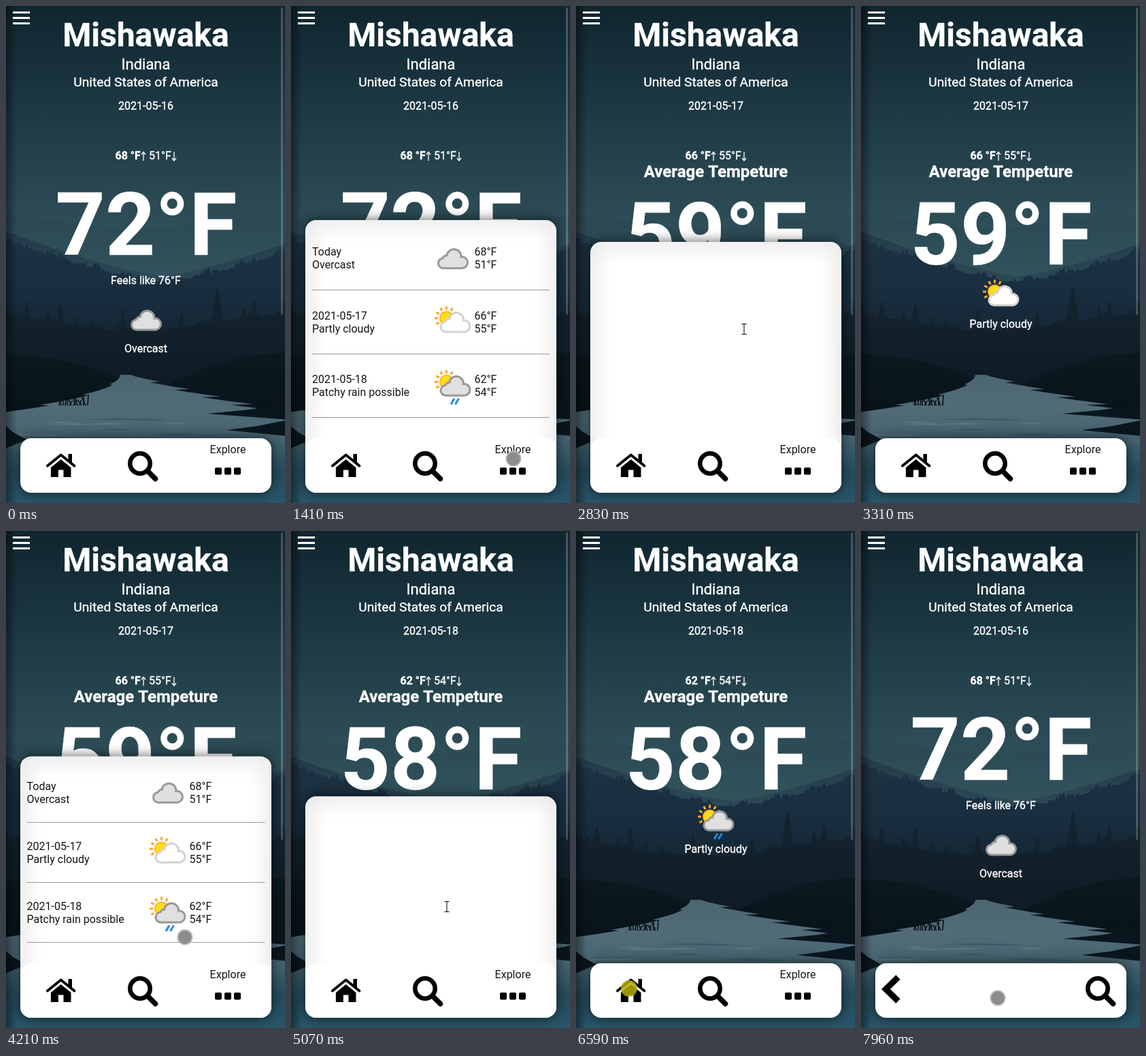
Recreate the animation shown at these times as an HTML page with a canvas. Size 410 by 729 pixels, loop 8000 ms.

```html
<!DOCTYPE html>
<html lang="en">
<head>
<meta charset="utf-8">
<title>Weather</title>
<style>
html, body { margin: 0; width: 100%; height: 100%; overflow: hidden; background: #10242f; }
canvas { display: block; width: 410px; height: 729px; }
</style>
</head>
<body>
<canvas id="stage" width="410" height="729"></canvas>
<script>
const W = 410, H = 729, LOOP = 8000, INK = '#151515';
const screenCtx = document.getElementById('stage').getContext('2d');
let c = screenCtx;

const days = [
  { date: '2021-05-16', name: 'Today', label: 'Overcast', hi: 68, lo: 51, main: '72°F', icon: 'cloud' },
  { date: '2021-05-17', name: '2021-05-17', label: 'Partly cloudy', hi: 66, lo: 55, main: '59°F', icon: 'sun' },
  { date: '2021-05-18', name: '2021-05-18', label: 'Patchy rain possible', hi: 62, lo: 54, main: '58°F', icon: 'rain' }
];

const clicks = [880, 2530, 3840, 4800, 6500, 7380];
const toggles = [1080, 2800, 3996, 5019]; // panel opens, closes, opens, closes
const HOME = 6710, SEARCH = 7450;

// stops of the pointer: arrival, departure, x, y
const stops = [
  [450, 450, 356, 700], [730, 1300, 348, 688], [1690, 1690, 274, 604], [2380, 2900, 247, 474],
  [3350, 4060, 346, 688], [4210, 4210, 263, 596], [4500, 5120, 229, 551],
  [5550, 5650, 215, 654], [6050, 6050, 150, 684], [6560, 6750, 78, 671], [7250, LOOP, 201, 685]
];

const within = (t, from, span) => t >= from && t < from + span;

// CSS "ease" curve
function ease(p) {
  if (p <= 0) return 0;
  if (p >= 1) return 1;
  let lo = 0, hi = 1, s = 0.5;
  for (let i = 0; i < 20; i++) {
    s = (lo + hi) / 2;
    if (0.75 * s * (1 - s) + s ** 3 < p) lo = s; else hi = s;
  }
  return 0.3 * s * (1 - s) ** 2 + 3 * s * s * (1 - s) + s ** 3;
}

const panelHeight = t =>
  toggles.reduce((h, start, i) => h + (i % 2 ? -320 : 320) * ease((t - start) / 300), 80);

function poly(points, fill) {
  c.beginPath();
  points.forEach(([x, y]) => c.lineTo(x, y));
  c.closePath();
  c.fillStyle = fill;
  c.fill();
}

function line(points, width, color, cap = 'butt') {
  c.beginPath();
  points.forEach(([x, y]) => c.lineTo(x, y));
  c.lineWidth = width;
  c.lineCap = cap;
  c.lineJoin = cap === 'round' ? 'round' : 'miter';
  c.strokeStyle = color;
  c.stroke();
}

function disc(x, y, r, fill) {
  c.beginPath();
  c.arc(x, y, r, 0, Math.PI * 2);
  c.fillStyle = fill;
  c.fill();
}

function box(x, y, w, h, r, fill) {
  c.beginPath();
  c.roundRect(x, y, w, h, r);
  c.fillStyle = fill;
  c.fill();
}

function text(str, x, y, { size = 16, color = '#fff', align = 'center', weight = 400 } = {}) {
  c.font = `${weight} ${size}px Roboto, sans-serif`;
  c.textAlign = align;
  c.fillStyle = color;
  c.fillText(str, x, y);
  if (color === INK) return;
  c.lineWidth = 0.35;
  c.strokeStyle = color;
  c.strokeText(str, x, y);
}

function vertical(y0, y1, ...colors) {
  const g = c.createLinearGradient(0, y0, 0, y1);
  colors.forEach((col, i) => g.addColorStop(i / (colors.length - 1), col));
  return g;
}

// ---- landscape ----
let seed = 7;
const rand = () => (seed = (seed * 16807) % 2147483647) / 2147483647;

const valley = (base, depth, power) => x => base - depth * Math.abs((x - 230) / 210) ** power;
const hills = x => 318 + 9 * Math.sin(x / 62 - 1.6);
const woods = x => 466 + 12 * Math.cos((x - 190) / 70);
const leftBank = x => x < 172 ? 512 + 36 * (x / 170) ** 2 : H;
const rightBank = x => x > 236 ? 510 + 43 * ((W - x) / 164) ** 2 : H;

function ridge(height, rough, fill) {
  const out = [[0, H]];
  for (let x = 0; x <= W; x += 2) {
    const clump = 0.6 + 0.4 * Math.sin(x / 9);
    out.push([x, height(x) - rand() * rough * clump]);
  }
  poly([...out, [W, H]], fill);
}

function pine(x, h, fill) {
  const base = woods(x) + 8, right = [], left = [];
  for (let i = 1; i <= 8; i++) {
    const y = base - h + h * i / 8, w = 1 + h * 0.2 * i / 8;
    right.push([x + w, y], [x + w / 2, y - 1]);
    left.unshift([x - w / 2, y - 1], [x - w, y]);
  }
  poly([[x, base - h], ...right, ...left], fill);
}

// stepped shores that widen towards the viewer
function river() {
  const left = [], right = [];
  for (let y = 541; y <= 598; y++) {
    const s = (y - 541) / 57;
    left.unshift([168 - 168 * s * s - 24 * s * ((y - 541) % 15 / 15), y]);
    right.push([184 + 200 * s ** 1.2 + 46 * Math.sqrt(s) * ((y - 541) % 11 / 11), y]);
  }
  poly([...right, [W, 598], [W, H], [0, H], ...left],
    vertical(540, H, '#4c6671', '#526c77', '#456370', '#264c5d', '#28566a'));
}

function islet(tip, y, end, h) {
  const mid = (tip + end) / 2;
  poly([[tip, y], [mid, y - h * 0.4], [end, y - h], [end, y + h * 0.6], [mid, y + h * 0.3]], '#0a161e');
}

function landscape() {
  c.fillStyle = vertical(0, 400, '#10262f', '#18323d', '#223f49', '#2c4b55', '#335660');
  c.fillRect(0, 0, W, H);
  ridge(hills, 0, vertical(305, 410, '#2a4852', '#33555f'));
  ridge(valley(396, 58, 1.3), 0, vertical(335, 410, '#233c4a', '#2d4a57'));
  ridge(valley(406, 54, 1.4), 13, vertical(350, 500, '#1c3141', '#182d3e', '#142534'));
  const dark = '#13222d';
  [[80, 38], [172, 42], [311, 60], [365, 34]].forEach(([x, h]) => pine(x, h, dark));
  for (let i = 0; i < 14; i++) pine(i * 30 + rand() * 20, 18 + rand() * 18, dark);
  ridge(woods, 10, vertical(450, 560, dark, '#0e1b25'));
  const bank = vertical(510, 600, '#0b191f', '#08131a');
  ridge(leftBank, 2, bank);
  ridge(rightBank, 2, bank);
  river();
  for (let x = 78; x < 122; x += 3) {
    line([[x, 586], [x + rand() * 12 - 6, 570 + rand() * 9]], 1.6, '#09141b');
  }
  for (let i = 0; i < 10; i++) {
    const x = rand() * 300, y = 600 + rand() * 30, w = 40 + rand() * 80;
    poly([[x, y], [x + w / 2, y - 1.5], [x + w, y], [x + w / 2, y + 1.5]], i % 2 ? '#3a5a69' : '#5a7680');
  }
  islet(296, 598, W, 14);
  islet(324, 622, W, 14);
  islet(30, 636, -10, 28);

  const edge = c.createLinearGradient(0, 0, 16, 0);
  edge.addColorStop(0, 'rgba(0,0,0,.42)');
  edge.addColorStop(1, 'rgba(0,0,0,0)');
  c.fillStyle = edge;
  c.fillRect(0, 0, 16, H);
}

const scene = document.createElement('canvas');
scene.width = W;
scene.height = H;
c = scene.getContext('2d');
landscape();
c = screenCtx;

// ---- weather icons ----
function cloud(x, y, edge, fill) {
  const puffs = [[-14, 6.5, 9], [-9, 1, 7.5], [1.5, -3.5, 12], [13, 5.5, 10]];
  [[0, edge], [3, fill]].forEach(([inset, col]) => {
    puffs.forEach(([dx, dy, r]) => disc(x + dx, y + dy, r - inset, col));
    c.fillRect(x - 14, y, 27, 15.5 - inset);
  });
}

function icon(kind, x, y) {
  if (kind === 'cloud') return cloud(x, y, '#999', '#e0e0e0');
  const sx = x - 9.5, sy = y - 6;
  for (let a = 0; a < 6.2; a += Math.PI / 6) {
    const dx = Math.cos(a), dy = Math.sin(a);
    line([[sx + dx * 12.5, sy + dy * 12.5], [sx + dx * 17.5, sy + dy * 17.5]], 3, '#f9a825');
  }
  disc(sx, sy, 10.5, '#f9a825');
  disc(sx, sy, 9, '#ffdd15');
  if (kind === 'sun') return cloud(x + 3.5, y, '#d2d2d2', '#fff');
  cloud(x + 3.5, y, '#999', '#e0e0e0');
  [-3, 3.5].forEach(dx => line([[x + dx, y + 27], [x + dx + 5, y + 18.5]], 3, '#2a86dd'));
}

// ---- page parts ----
function arrow(x, dir) {
  const tip = 220.5 - dir * 6.5;
  line([[x, 220.5 + dir * 6.5], [x, tip + dir]], 1.3, '#fff');
  line([[x - 3, tip + dir * 4], [x, tip], [x + 3, tip + dir * 4]], 1.3, '#fff');
}

function header(day) {
  const mid = 205.5, today = day === days[0];
  [8, 16, 24].forEach(y => box(10, y, 25, 3, 0, '#fff'));
  text('Mishawaka', mid, 59, { size: 48, weight: 700 });
  text('Indiana', mid, 93, { size: 22 });
  text('United States of America', mid, 118, { size: 19.2 });
  text(day.date, mid, 152);
  text(day.hi + ' °F', 160.5, 225, { align: 'left', weight: 700 });
  arrow(202, 1);
  text(day.lo + '°F', 210, 225, { align: 'left' });
  arrow(247, -1);
  text(day.main, 206, today ? 365 : 379, { size: 128, weight: 700 });
  if (today) {
    text('Feels like 76°F', mid, 408);
  } else {
    text('Average Tempeture', mid, 251, { size: 24, weight: 700 });
  }
  icon(day.icon, 206, today ? 461 : 425);
  text(today ? 'Overcast' : 'Partly cloudy', mid, today ? 508 : 472);
}

function list(h) {
  const inset = h / 40, top = 714 - h + inset, pitch = Math.max(44, (604 - top) / 3);
  if (top >= 604) return;
  const x = 21 + inset, style = { color: INK, align: 'left' };
  c.save();
  c.beginPath();
  c.rect(21, top, 369, 604 - top);
  c.clip();
  days.forEach((d, i) => {
    const y = top + pitch * (i + 0.5);
    text(d.name, x, y - 4.5, style);
    text(d.label, x, y + 14.5, style);
    icon(d.icon, 238, y);
    text(d.hi + '°F', 269.5, y - 4.5, style);
    text(d.lo + '°F', 269.5, y + 14.5, style);
    box(x, Math.round(y + pitch / 2) - 1, 369 - inset * 2, 1, 0, '#999');
  });
  c.restore();
}

function panel(h, filled) {
  const y = 714 - h;
  c.save();
  c.shadowColor = 'rgba(0,0,0,.65)';
  c.shadowBlur = 18;
  box(21, y, 369, h, 16, '#fff');
  c.restore();
  if (h < 81) return;
  // inner shadow
  c.save();
  c.clip();
  c.shadowColor = 'rgba(0,0,0,.3)';
  c.shadowBlur = 32;
  c.beginPath();
  c.roundRect(17, y - 4, 377, h + 8, 20);
  c.lineWidth = 8;
  c.strokeStyle = '#fff';
  c.stroke();
  c.restore();
  if (filled) list(h);
  box(21, 634, 369, 80, 16, '#fff');
}

function glass(x) {
  c.beginPath();
  c.arc(x - 4, 671, 14.7, 0, Math.PI * 2);
  c.lineWidth = 6.6;
  c.strokeStyle = '#000';
  c.stroke();
  line([[x + 7.5, 682.5], [x + 18.5, 693.5]], 7.5, '#000', 'round');
}

function house(x) {
  line([[x - 19.8, 674.5], [x, 658.5], [x + 19.8, 674.5]], 3.8, '#000', 'round');
  box(x + 10.8, 657, 5.5, 12, 0.5, '#000');
  const half = [[14.8, 677], [14.8, 691], [3.8, 691], [3.8, 680.5]];
  const side = dir => half.map(([dx, y]) => [x + dir * dx, y]);
  poly([[x, 665], ...side(1), ...side(-1).reverse()], '#000');
}

function nav(searching) {
  if (searching) {
    line([[54.5, 654.5], [36.5, 672], [54.5, 689.5]], 9, '#000');
    return glass(352);
  }
  house(80.7);
  glass(201);
  text('Explore', 326, 656, { color: INK });
  [307, 321, 335].forEach(x => box(x, 677, 10, 10.5, 2, '#000'));
}

function pointer(t) {
  if (t < stops[0][0] || within(t, 3295, 55)) return;
  let i = stops.length - 1;
  while (stops[i][0] > t) i--;
  const [, leave, x0, y0] = stops[i];
  const [arrive, , x1, y1] = stops[i + 1] || [LOOP + 1, 0, x0, y0];
  const k = Math.max(0, (t - leave) / (arrive - leave));
  const x = x0 + (x1 - x0) * k, y = y0 + (y1 - y0) * k;
  if (within(t, toggles[1], 120) || within(t, toggles[3], 120)) {
    line([[x, y - 7], [x, y + 7]], 1.2, '#222');
    [-7.5, 7.5].forEach(d => line([[x - 3.5, y + d], [x + 3.5, y + d]], 1.2, '#222'));
  } else if (clicks.some(start => within(t, start, 205))) {
    disc(x, y, 12, 'rgba(180,172,8,.85)');
  } else {
    disc(x, y, 11.5, '#b8b8b8');
    disc(x, y, 9.7, '#8c8c8c');
  }
}

function draw(t) {
  const day = t < toggles[1] || t >= HOME ? 0 : t < toggles[3] ? 1 : 2;
  const filled = toggles.filter(start => t >= start).length % 2 === 1;
  c.drawImage(scene, 0, 0);
  header(days[day]);
  box(404, 2, 3, 451, 1.5, 'rgba(255,255,255,.22)');
  panel(panelHeight(t), filled);
  nav(t >= SEARCH);
  pointer(t);
}

const begin = performance.now();
function tick() {
  draw((performance.now() - begin) % LOOP);
  requestAnimationFrame(tick);
}
tick();
</script>
</body>
</html>
```
